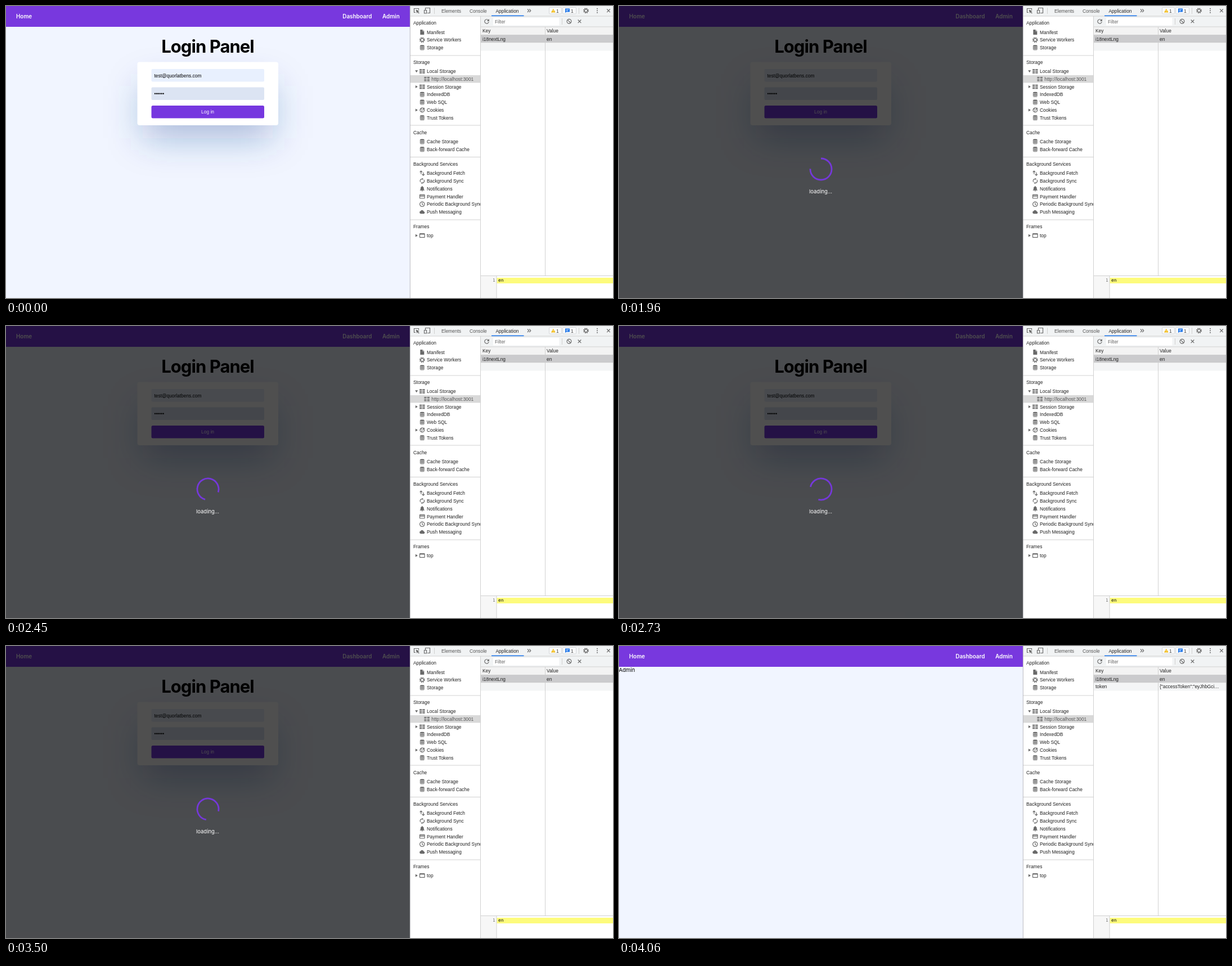
An HTML page for the animation above (6300 ms loop, 1079 px wide and 519 px high).

```html
<!DOCTYPE html>
<html lang="en">
<head>
<meta charset="utf-8">
<title>Login demo</title>
<style>
  html, body { margin: 0; width: 100%; height: 100%; overflow: hidden; background: #f1f5ff; }
  svg { display: block; }
  text { white-space: pre; }
  .ui { font: 8.4px "Liberation Sans", Arial, sans-serif; fill: #222; }
  .app { font: 9.5px Inter, sans-serif; }
  .nav { font-weight: 600; font-size: 9.9px; fill: #fff; }
  .title { font: 700 31px Inter, sans-serif; letter-spacing: -.95px; text-anchor: middle; }
  .code { font: 7.8px "DejaVu Sans Mono", monospace; }
  .mid { text-anchor: middle; }
  .line { fill: none; stroke: #6a6a6a; stroke-width: 1.2; }
  .solid { fill: #6a6a6a; }
</style>
</head>
<body>
<svg width="1079" height="519" viewBox="0 0 1079 519">
  <defs>
    <filter id="soft" x="-60%" y="-130%" width="220%" height="360%"><feGaussianBlur stdDeviation="32"/></filter>
    <clipPath id="sideClip"><rect x="718" y="0" width="125.500" height="519"/></clipPath>
    <clipPath id="pageClip"><rect width="718" height="519"/></clipPath>

    <g id="file"><path class="solid" d="M-3.500-4.500H1L3.500-2V4.500H-3.500Z"/><path d="M1-4.500V-2H3.500" fill="none" stroke="#fff" stroke-width=".7"/></g>
    <g id="gear"><circle class="line" r="2.600" stroke-width="2"/><circle class="line" r="4" stroke-dasharray="1.800 1.342" style="stroke-width:1.8"/></g>
    <g id="db"><rect class="solid" x="-4" y="-4.500" width="8" height="9" rx="2"/><path d="M-4-2Q0-.6 4-2M-4 .5Q0 1.900 4 .5M-4 2.800Q0 4.200 4 2.800" fill="none" stroke="#fff" stroke-width=".8"/></g>
    <g id="grid"><path class="solid" d="M-4.800-3.800H4.800V3.800H-4.800Z"/><path d="M-5-1.300H5M-5 1.300H5M0-4V4" stroke="#fff" stroke-width=".9"/></g>
    <g id="cookie"><circle class="line" r="3.800"/><g class="solid"><circle cx="-1.500" cy="-1.300" r="1"/><circle cx="1.500" cy="-.6" r="1"/><circle cx="-.6" cy="1.600" r="1"/><circle cx="3" cy="-3" r="1.200"/></g></g>
    <g id="fetch"><path class="line" d="M-2 1.500V-4M-4.200-1.800L-2-4L.2-1.800M2-1.500V4M-.2 1.800L2 4L4.200 1.800"/></g>
    <g id="sync"><path class="line" d="M-3 2.200A3.600 3.600 0 0 1 0-3.600M3-2.200A3.600 3.600 0 0 1 0 3.600"/><path class="solid" d="M0-5.500L2.200-3.600L0-1.700ZM0 5.500L-2.200 3.600L0 1.700Z"/></g>
    <g id="bell"><path class="solid" d="M-4 3V2.300L-2.900 1.200V-1Q-2.900-3.300-.8-3.800V-4.600H.8V-3.800Q2.900-3.300 2.900-1V1.200L4 2.300V3ZM-1.100 3.500H1.100Q1 4.700 0 4.700T-1.100 3.500"/></g>
    <g id="card"><rect class="line" x="-4.300" y="-3.200" width="8.600" height="6.400" rx=".6"/><path class="solid" d="M-4-1.800H4V0H-4Z"/></g>
    <g id="clock"><circle class="line" r="4.200"/><path class="line" d="M0-2.500V.2L2 1.400" stroke-width=".9"/></g>
    <g id="cloud"><path class="solid" d="M-2.600 3.100A2.400 2.400 0 0 1-2.900-1.600A3.200 3.200 0 0 1 3-.8A2 2 0 0 1 3 3.100Z"/></g>
    <g id="frame"><rect class="line" x="-4.300" y="-3.400" width="8.600" height="6.800" rx=".7"/><path class="solid" d="M-4.300-3.400H4.300V-1.800H-4.300Z"/></g>
    <path id="right" class="solid" d="M-1.800-2.500L2.200 0L-1.800 2.500Z"/>
    <path id="down" class="solid" d="M-2.500-1.800H2.500L0 2.200Z"/>
    <path id="cross" class="line" d="M-2.800-2.800L2.800 2.800M2.800-2.800L-2.800 2.800"/>
  </defs>

  <!-- Web page -->
  <g clip-path="url(#pageClip)">
    <rect width="718" height="519" fill="#f1f5ff"/>
    <g id="login">
      <rect x="243" y="142" width="231" height="93" fill="#234b96" fill-opacity=".34" filter="url(#soft)"/>
      <text class="title" x="358.500" y="82.500">Login Panel</text>
      <rect x="233.500" y="99.500" width="250.500" height="112.500" rx="4" fill="#fff"/>
      <rect x="258.500" y="112" width="200.500" height="22.500" rx="2" fill="#e8f0fe"/>
      <rect x="258.500" y="144.500" width="200.500" height="22.500" rx="2" fill="#dce4f3"/>
      <rect x="258.500" y="177" width="200.500" height="22.500" rx="2.500" fill="#7637df"/>
      <text class="ui" x="263.500" y="126.500" style="fill:#000">test@quorlatbens.com</text>
      <text class="ui" x="263.500" y="158.800" style="fill:#000">••••••</text>
      <text class="ui mid" x="358.500" y="191.300" style="fill:#fff">Log in</text>
    </g>
    <text id="admin" class="app" x="-.3" y="46">Admin</text>
    <rect width="718" height="37" fill="#7838de"/>
    <text class="app nav" x="18" y="22">Home</text>
    <text class="app nav" x="598.300" y="22">Dashboard</text>
    <text class="app nav" x="669" y="22">Admin</text>
    <g id="loading">
      <rect width="718" height="519" fill="#000" fill-opacity=".69"/>
      <circle id="spinner" cx="359" cy="290" r="19" fill="none" stroke="#7538da" stroke-width="2.800" pathLength="360" stroke-dasharray="272 88"/>
      <text class="app mid" x="358.500" y="333" fill="#fff" font-weight="500">loading...</text>
    </g>
  </g>

  <!-- Developer tools -->
  <rect x="718" width="361" height="519" fill="#fff"/>
  <rect x="718" width="361" height="18" fill="#f1f3f4"/>
  <rect x="844" y="18" width="235" height="19" fill="#f1f3f4"/>
  <rect x="844" y="37" width="235" height="14.500" fill="#f3f3f3"/>
  <rect x="844" y="51.500" width="235" height="14" fill="#cbcbcd"/>
  <rect x="844" y="65.500" width="235" height="14" fill="#f4f5f6"/>
  <rect x="718" y="123" width="125.500" height="13.500" fill="#d9d9d9"/>
  <rect x="866" y="21" width="117.500" height="13.500" rx="1" fill="#fff"/>
  <rect x="844" y="480" width="28" height="39" fill="#f7f7f7"/>
  <rect x="872.500" y="483" width="206.500" height="10" fill="#fdfb7c"/>
  <path d="M718 18H1079M844 37H1079M844 51.500H1079M844 479.500H1079M843.500 18V519M958.500 37V479.500M718 88H843.500M718 212H843.500M718 268.500H843.500M718 380H843.500M761.500 3V14M988.500 22V33M1018.500 3V14M872 480V519" fill="none" stroke="#ccc" stroke-width=".9"/>
  <path d="M718.300 0V519" stroke="#b5b5b8" stroke-width=".9"/>
  <rect x="863" y="16.600" width="57.500" height="1.500" fill="#1a73e8"/>

  <!-- Toolbar icons -->
  <path class="line" d="M728 11.500H725.500V4.500H733.500V7" stroke-width="1"/>
  <path class="solid" d="M728.500 6.500L735 9L732.400 10L734.800 12.400L733.800 13.400L731.400 11L730.500 13.200Z"/>
  <path class="line" d="M745.500 8V3.500H753.500V12.500H749M743.500 7.500H747.500V13H743.500Z" stroke-width="1"/>
  <path class="line" d="M927 5.500L929.500 8.200L927 11M930.300 5.500L932.800 8.200L930.300 11" stroke-width="1"/>
  <g fill="#f8f9fa" stroke="#cfd1d4" stroke-width=".8">
    <rect x="965.500" y="2.500" width="22" height="11.500" rx="1.500"/>
    <rect x="989.500" y="2.500" width="24" height="11.500" rx="1.500"/>
  </g>
  <path d="M972.800 4.800L976.600 11.600H969Z" fill="#f2b90d"/>
  <path d="M972.800 7V9.200M972.800 9.800V10.700" stroke="#fff" stroke-width=".9"/>
  <path d="M994 4.500H1002V10.500H996L994 12.300Z" fill="#1a73e8"/>
  <path d="M995.500 6.500H1000.500M995.500 8.500H999" stroke="#fff" stroke-width=".8"/>
  <use href="#gear" x="1031" y="8.300"/>
  <g class="solid"><circle cx="1051" cy="4.800" r="1"/><circle cx="1051" cy="8.300" r="1"/><circle cx="1051" cy="11.800" r="1"/></g>
  <use href="#cross" x="1071" y="8.300"/>
  <path class="line" d="M857.500 25.200A3.700 3.700 0 1 0 858.200 28"/>
  <path class="solid" d="M858.800 23V27H854.800Z"/>
  <g class="line"><circle cx="1001" cy="27.300" r="3.900"/><path d="M998.300 24.600L1003.700 30"/></g>
  <use href="#cross" x="1019.500" y="27.300"/>

  <g id="tree" clip-path="url(#sideClip)"></g>
  <g id="labels"></g>
  <g id="token">
    <text class="ui" x="847" y="75">token</text>
    <text class="ui" x="961" y="75">{"accessToken":"eyJhbGci…</text>
  </g>
  <text class="code" x="865" y="490" fill="#777">1</text>
  <text class="code" x="875" y="490">en</text>
</svg>

<script>
const byId = id => document.getElementById(id);
const label = (x, y, s, fill = '#222') =>
  `<text class="ui" x="${x}" y="${y + 3}" style="fill:${fill}">${s}</text>`;
const use = (id, x, y) => `<use href="#${id}" x="${x}" y="${y}"/>`;

// Each section: heading, heading y, first row y, rows of [icon, text, arrow, indent]
const sections = [
  ['Application', 30.3, 46.5, [['file', 'Manifest'], ['gear', 'Service Workers'], ['db', 'Storage']]],
  ['Storage', 100.3, 116, [
    ['grid', 'Local Storage', 'down'], ['grid', 'http://localhost:3001', '', 8.3],
    ['grid', 'Session Storage', 'right'], ['db', 'IndexedDB'], ['db', 'Web SQL'],
    ['cookie', 'Cookies', 'right'], ['db', 'Trust Tokens']]],
  ['Cache', 224.8, 241, [['db', 'Cache Storage'], ['db', 'Back-forward Cache']]],
  ['Background Services', 281, 297.2, [
    ['fetch', 'Background Fetch'], ['sync', 'Background Sync'], ['bell', 'Notifications'],
    ['card', 'Payment Handler'], ['clock', 'Periodic Background Sync'], ['cloud', 'Push Messaging']]],
  ['Frames', 392.3, 408, [['frame', 'top', 'right']]]
];
const ROW = 13.78;

byId('tree').innerHTML = sections.map(([head, headY, top, rows]) =>
  label(724, headY, head) + rows.map(([icon, text, arrow, indent = 0], i) => {
    const y = top + i * ROW;
    return use(icon, 739.8 + indent, y) + label(748 + indent, y, text, indent ? '#555' : '#222') +
      (arrow ? use(arrow, 729.7, y) : '');
  }).join('')).join('');

byId('labels').innerHTML = [
  [774, 8.5, 'Elements', '#555'], [824, 8.5, 'Console', '#555'], [870.5, 8.5, 'Application'],
  [978, 8.5, '1', '#444'], [1004, 8.5, '1', '#444'], [869, 27.8, 'Filter', '#666'],
  [847, 44.3, 'Key'], [961, 44.3, 'Value'], [847, 58.5, 'i18nextLng'], [961, 58.5, 'en']
].map(a => label(...a)).join('');

const LOOP = 6300, STEP = 70, LOAD = 1960, DONE = 4060;
// Spinner [time, degrees], linear between entries
const spin = [[1960, 270], [2450, 465], [3080, 661], [3990, 1005]];

function angleAt(t) {
  let i = 1;
  while (i < spin.length - 1 && t > spin[i][0]) i++;
  const [t0, a0] = spin[i - 1], [t1, a1] = spin[i];
  return a0 + (a1 - a0) * (t - t0) / (t1 - t0);
}

const show = (id, on) => byId(id).setAttribute('visibility', on ? 'visible' : 'hidden');

function draw() {
  const t = Math.floor(performance.now() % LOOP / STEP) * STEP;
  const done = t >= DONE;
  show('login', !done);
  show('admin', done);
  show('token', done);
  show('loading', t >= LOAD && !done);
  byId('spinner').setAttribute('transform', `rotate(${angleAt(t)} 359 290)`);
  requestAnimationFrame(draw);
}
draw();
</script>
</body>
</html>
```
